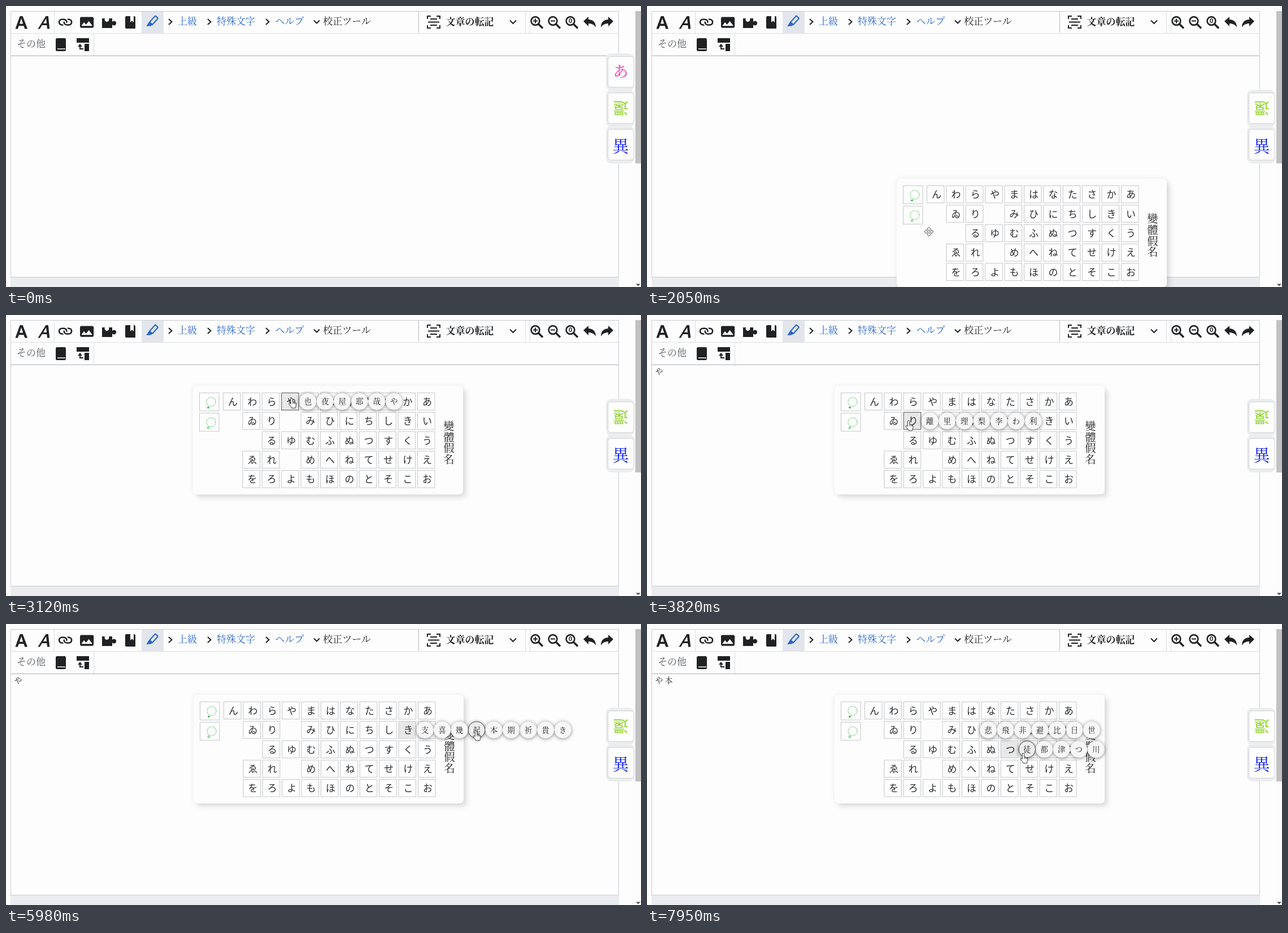
Write an HTML page that moves like this. It is 1124x498 px and loops after 8 s.

```html
<!DOCTYPE html>
<html lang="ja">
<head>
<meta charset="utf-8">
<style>
html, body { margin: 0; width: 100%; height: 100%; overflow: hidden; background: #fdfdfd; }
svg { display: block; width: 1124px; height: 498px; }
text { text-anchor: middle; }
.serif { font-family: "Noto Serif CJK JP", "Noto Serif JP", "Noto Serif", "Noto Sans CJK JP", serif; }
.sans { font-family: "Noto Sans CJK JP", "Noto Sans CJK", "Noto Sans", sans-serif; }
.latin { font-family: Inter, "Liberation Sans", sans-serif; }
.line { fill: none; stroke: #202122; }
.panel { filter: drop-shadow(6px 6px 4px rgba(0,0,0,.1)) drop-shadow(0 0 4px rgba(0,0,0,.07)); }
.set { filter: drop-shadow(0 1px 3px rgba(0,0,0,.45)); }
</style>
</head>
<body>
<svg id="stage" viewBox="0 0 1124 498"></svg>
<script>
const LOOP = 8000, PITCH = 34.4, CELL = 30.5, STEP = 30.5, INK = '#202122', BLUE = '#2a66cc';
const columns = ['あいうえお', 'かきくけこ', 'さしすせそ', 'たちつてと', 'なにぬねの', 'はひふへほ',
  'まみむめも', 'や ゆ よ', 'らりるれろ', 'わゐ ゑを', 'ん'];

// kana, its variants, time shown, time hidden
const variantSets = [
  ['や', '也夜屋耶哉や', 2720, 3760],
  ['り', '離里理梨李わ利', 3770, 4080],
  ['お', '於隠意尾緒お', 4480, 4720],
  ['え', '江衣盈え', 4600, 4780],
  ['う', '宇有憂う', 4650, 4820],
  ['い', '移意伊以', 4700, 4990],
  ['き', '支喜幾起本期祈貴き', 4960, 6520],
  ['に', '仁尓児耳而爾二丹', 6720, 7150],
  ['ひ', '悲飛非避比日世', 6770, 7120],
  ['み', '才見ろみ美御三', 6820, 7470],
  ['ひ', '悲飛非避比日世', 7440, LOOP],
  ['つ', '徒都津つ川', 7740, LOOP]
];

const cursorPath = [
  [310, 680, -5], [420, 743, 42], [630, 1058, 115], [770, 1058, 115], [960, 1085, 115], [1110, 1085, 115],
  [1900, 499, 408], [2050, 499, 400], [2320, 390, 225], [2460, 390, 225], [2570, 420, 238], [2780, 505, 160],
  [3260, 506, 144], [3400, 506, 142], [3730, 506, 142], [3820, 463, 187], [4020, 372, 275], [4200, 520, 328],
  [4440, 730, 322], [4540, 742, 292], [4750, 742, 190], [4860, 728, 180], [5000, 712, 186], [5270, 712, 186],
  [6020, 833, 189], [6170, 833, 189], [6260, 863, 187], [6450, 863, 187], [6920, 536, 206], [7250, 528, 205],
  [7480, 565, 194], [7660, 622, 194], [7800, 642, 218], [7950, 666, 229]
];
const panelPath = [[1110, 1028, 21], [1900, 442, 314], [2050, 442, 306], [2320, 331, 125.5]];

const label = (s, x, y, size, fill = INK, cls = 'serif', extra = '') =>
  `<text class="${cls}" x="${x}" y="${y + size * .38}" font-size="${size}" fill="${fill}" ${extra}>${s}</text>`;
const rect = (x, y, w, h, fill, extra = '') =>
  `<rect x="${x}" y="${y}" width="${w}" height="${h}" fill="${fill}" ${extra}/>`;
const shape = (d, fill = INK, extra = '') => `<path d="${d}" fill="${fill}" ${extra}/>`;
const stroke = (d, width = 2, color = INK) => `<path d="${d}" fill="none" stroke="${color}" stroke-width="${width}"/>`;
const at = (x, y, content, more = '') => `<g transform="translate(${x} ${y}) ${more}">${content}</g>`;

function chevron(x) { return stroke(`M${x - 3} 23l5.5 5-5.5 5`, 2); }

function magnifier(x, inner) {
  return at(x, 26.5, '<circle class="line" r="7.4" stroke-width="2.6"/>' + stroke('M5.5 5.5l7.5 7.5', 3.4) + inner);
}

function toolbar() {
  const undo = shape('M1022 27l9-8v5c8 0 13 5 13 14-3-5-7-7-13-7v5z');
  const halfLink = shape('M4.8 15h2.9a4.900 4.900 0 0 1-1.500-2H5a3 3 0 1 1 0-6h3a3 3 0 0 1 2.800 4h2.100a4.800 4.800 0 0 0 .1-1A4.900 4.900 0 0 0 8.100 5H4.800a5 5 0 0 0 0 10z');
  return rect(8.5, 9.5, 1076, 489, 'none', 'stroke="#c8ccd1"') +
    rect(8, 480, 1077, 18, '#eaecf0') + stroke('M8 480.5h1077', 1, '#c8ccd1') +
    stroke('M8 48.5h1077', 1, '#dcdee1') + stroke('M8 88.3h1077', 1.5, '#c3c6ca') +
    stroke('M85.5 10v38M919.5 10v38M927.5 10v38M155.5 49v39', 1, '#dcdee1') +
    stroke('M730.5 10v37', 1, '#b5b8bc') +
    rect(240, 10, 39, 38, '#e2e6ec') +
    shape('M16.500 40.500L24.600 18h5L38 40.500h-4.700l-1.800-5.200h-8.800l-1.800 5.200zM24 31.500h6.200L27.100 22z', INK, 'fill-rule="evenodd"') +
    shape('M56.500 40.500L70.500 18h4.300l2.400 22.500h-4.200l-.7-6.500h-8.600l-3.800 6.500zM65.800 30.800h6.200l-.9-8.600z', INK, 'fill-rule="evenodd"') +
    at(93, 16.5, halfLink + at(20, 20, halfLink, 'scale(-1)'), 'scale(1.21)') +
    at(131, 17, shape('M2 2a2 2 0 0 0-2 2v12a2 2 0 0 0 2 2h16a2 2 0 0 0 2-2V4a2 2 0 0 0-2-2zM1.800 15l4.100-5.200 2.900 3.500L12.900 8l5.300 7z', INK, 'fill-rule="evenodd"'), 'scale(1.21)') +
    shape('M170 22h5a4 4 0 1 0 7 0h6v6a4 4 0 1 1 0 5v6h-18z') + '<circle cx="178.500" cy="22" r="3.500" fill="#fdfdfd"/>' +
    shape('M213 18h14a2 2 0 0 1 2 2v20h-16a2 2 0 0 1-2-2V20a2 2 0 0 1 2-2z') + shape('M220 18h6v11l-3-3-3 3z', '#fff') +
    at(260, 27, rect(-3.3, -10, 6.6, 15, 'none', `stroke="${BLUE}" stroke-width="2.1" rx="1"`) +
      shape('M-4.300 5h8.600l-2 4.500-5 5z', BLUE), 'rotate(42)') +
    chevron(291) + label('上級', 321, 27, 17, BLUE) +
    chevron(360) + label('特殊文字', 407, 27, 17, BLUE) +
    chevron(463) + label('ヘルプ', 502, 27, 17, BLUE) +
    stroke('M545 25.500l5 5 5-5') + label('校正ツール', 603.5, 27, 17) +
    stroke('M746 23v-5h6M762 18h6v5M746 34v5h6M762 39h6v-5M751 23h12M747 28.500h20M751 34h12', 2) +
    label('文章の転記', 821, 28, 17, INK, 'serif', 'font-weight="600"') + stroke('M892 25.500l5.500 5.500 5.500-5.500') +
    magnifier(937, stroke('M-4 0h8M0-4v8')) + magnifier(968, stroke('M-4 0h8')) +
    magnifier(999, label('0', 0, 0, 10, INK, 'latin', 'font-weight="700"')) +
    undo + `<g transform="matrix(-1 0 0 1 2097 0)">${undo}</g>` +
    label('その他', 44.5, 67, 17, '#54595d') +
    rect(88, 57, 18, 23, INK, 'rx="2.500"') + stroke('M91 76h14', 1.5, '#fff') +
    shape('M125 57h22v8h-22zM139 67h8v13h-8z') + stroke('M137 76h-6v-5', 2) + shape('M127 72l4-5 4 5z');
}

function tab(id, y, content) {
  return `<g id="${id}">${rect(1062, y - 5, 50, 66, '#ecedee', 'rx="9"')}` +
    rect(1065.5, y + .5, 46, 54.5, '#fefefe', 'rx="5" stroke="#cdcfd2"') + content + '</g>';
}

function cellAt(kana) {
  const col = columns.findIndex(c => c.includes(kana));
  return { x: 397.5 - PITCH * col, y: 12.5 + PITCH * columns[col].indexOf(kana) };
}

const cells = [...columns.join('').replace(/ /g, '')].map(kana => ({ kana, ...cellAt(kana) }));
const sets = variantSets.map(([kana, glyphs, from, to]) => {
  const { x, y } = cellAt(kana);
  const circles = [...glyphs].map((glyph, i) => ({ glyph, x: x + CELL + 16 + STEP * i, y: y + CELL / 2 }));
  return { kana, from, to, circles };
});

function markButton(y, mark) {
  return rect(11.5, y, 34.5, 32, '#fefefe', 'stroke="#c4c6c9"') +
    `<circle cx="32" cy="${y + 16}" r="8" fill="none" stroke="#3cb54a" stroke-width="1.200" stroke-dasharray="1.200 1.500"/>` +
    at(27, y + 26, mark);
}

function panel() {
  const keys = cells.map(c => `<rect class="key" x="${c.x}" y="${c.y}" width="${CELL}" height="${CELL}"/>` +
    label(c.kana, c.x + 17, c.y + CELL / 2, 17, '#2c2c2c', 'sans')).join('');
  const popups = sets.map(s => '<g class="set">' + s.circles.map(c =>
    `<circle class="disc" cx="${c.x}" cy="${c.y}" r="14.800"/>` +
    label(c.glyph, c.x, c.y, 13.5, '#222')).join('') + '</g>').join('');
  const title = [...'變體假名'].map((ch, i) => label(ch, 453, 71 + 19.6 * i, 19.5)).join('');
  return '<g id="panel">' + rect(0, 0, 478, 192.5, '#fdfdfd', 'rx="7" class="panel"') +
    markButton(12.5, shape('M-2.500 0l2.500-2 2.500 2-2.500 2z', '#3cb54a')) +
    markButton(48.5, '<circle r="1.700" fill="none" stroke="#3cb54a"/>') +
    keys + title + popups + '</g>';
}

const pointer = (name, d) => shape(d, '#fff', `class="pointer" data-name="${name}" stroke="#333" stroke-width="1" stroke-linejoin="round"`);
const diamond = (x, y) => `M${x} ${y - 3.2}l3.2 3.2-3.2 3.2-3.2-3.2z`;

const stage = document.getElementById('stage');
stage.innerHTML = rect(0, 0, 1124, 498, '#fdfdfd') + toolbar() +
  `<g id="typed1">${label('や', 21.5, 100, 13.5)}</g><g id="typed2">${label('本', 38.5, 100, 13.5)}</g>` +
  tab('kanaTab', 89, label('あ', 1088, 116, 27, '#f032a5')) +
  tab('turnedTab', 153.5, label('還', 0, 0, 27, '#8fd42c', 'sans', 'font-weight="500" transform="translate(1088 181) rotate(180)"')) +
  tab('variantTab', 218, label('異', 1088, 247.5, 29.5, '#0a1cf0')) +
  panel() +
  rect(1112.5, 0, 12, 498, '#fcfcfc') + rect(1114, 9, 10, 270, '#c1c1c1') + shape('M1115 492.500h8l-4 4z', '#505050') +
  '<g id="cursor">' +
  pointer('arrow', 'M0 0v16l4-3.500 2.500 6 2.500-1-2.500-6h5z') +
  pointer('beam', 'M-3-8h6v1.500h-2v13h2v1.500h-6v-1.500h2v-13h-2z') +
  pointer('hand', 'M-1.700 1.700a1.700 1.700 0 0 1 3.400 0v5c4 .4 6.300 1 6.300 3.500 0 3-1 4-1.500 7.500h-6.500c-1-3-4-5-5-7.500 0-1.600 1.500-1.800 3.300.3zM2 6.700v3.500M4.500 7.200v3M6.600 8v2.500') +
  pointer('move', diamond(0, -4.7) + diamond(4.7, 0) + diamond(0, 4.7) + diamond(-4.7, 0)) +
  '</g>';

const all = selector => [...stage.querySelectorAll(selector)];
const byId = id => document.getElementById(id);
const show = (el, on) => el.setAttribute('display', on ? 'inline' : 'none');
const moveTo = (el, p) => el.setAttribute('transform', `translate(${p.x} ${p.y})`);

all('.key').forEach((el, i) => cells[i].el = el);
all('.set').forEach((el, i) => {
  sets[i].el = el;
  el.querySelectorAll('.disc').forEach((disc, j) => sets[i].circles[j].el = disc);
});
const pointers = all('.pointer');

function along(path, t) {
  const next = path.findIndex(p => p[0] > t);
  const [t1, x1, y1] = next < 0 ? path[path.length - 1] : path[next];
  if (next <= 0) return { x: x1, y: y1 };
  const [t0, x0, y0] = path[next - 1];
  const u = (t - t0) / (t1 - t0), e = u * u * (3 - 2 * u);
  return { x: x0 + (x1 - x0) * e, y: y0 + (y1 - y0) * e };
}

function findHover(x, y, t) {
  const open = sets.filter(s => t >= s.from && t < s.to).reverse();
  for (const set of open) {
    const circle = set.circles.find(c => Math.hypot(c.x - x, c.y - y) < 15.3);
    if (circle) return { circle, kana: set.kana };
  }
  const cell = cells.find(c => x >= c.x && x <= c.x + CELL && y >= c.y && y <= c.y + CELL);
  return cell ? { kana: cell.kana } : null;
}

function cursorType(t, hover, x, y) {
  if (t < 770) return 'arrow';
  if (t < 1110) return 'hand';
  if (t < 2400) return 'move';
  if (hover) return 'hand';
  return x > 0 && x < 478 && y > 0 && y < 193 ? 'move' : 'beam';
}

function render(t) {
  const cursor = along(cursorPath, t), origin = along(panelPath, t);
  if (t >= 3550) origin.x += 1;
  const x = cursor.x - origin.x, y = cursor.y - origin.y;
  const hover = t > 2460 ? findHover(x, y, t) : null;

  show(byId('kanaTab'), t < 1110);
  show(byId('panel'), t >= 1110);
  show(byId('typed1'), t >= 3550);
  show(byId('typed2'), t >= 6450);
  moveTo(byId('panel'), origin);

  for (const cell of cells) {
    const active = hover && hover.kana === cell.kana;
    cell.el.setAttribute('fill', active ? '#e8e8e8' : '#fefefe');
    cell.el.setAttribute('stroke', active && !hover.circle ? '#555' : '#c4c6c9');
  }
  for (const set of sets) {
    show(set.el, t >= set.from && t < set.to);
    for (const c of set.circles) {
      const active = hover && hover.circle === c;
      c.el.setAttribute('fill', active ? '#ededed' : '#f7f7f7');
      c.el.setAttribute('stroke', active ? '#444' : '#e8e8e8');
    }
  }

  const type = cursorType(t, hover, x, y);
  show(byId('cursor'), t >= 310);
  moveTo(byId('cursor'), cursor);
  pointers.forEach(p => show(p, p.dataset.name === type));
}

const start = performance.now();
function tick() {
  render((performance.now() - start) % LOOP);
  requestAnimationFrame(tick);
}
tick();
</script>
</body>
</html>
```
